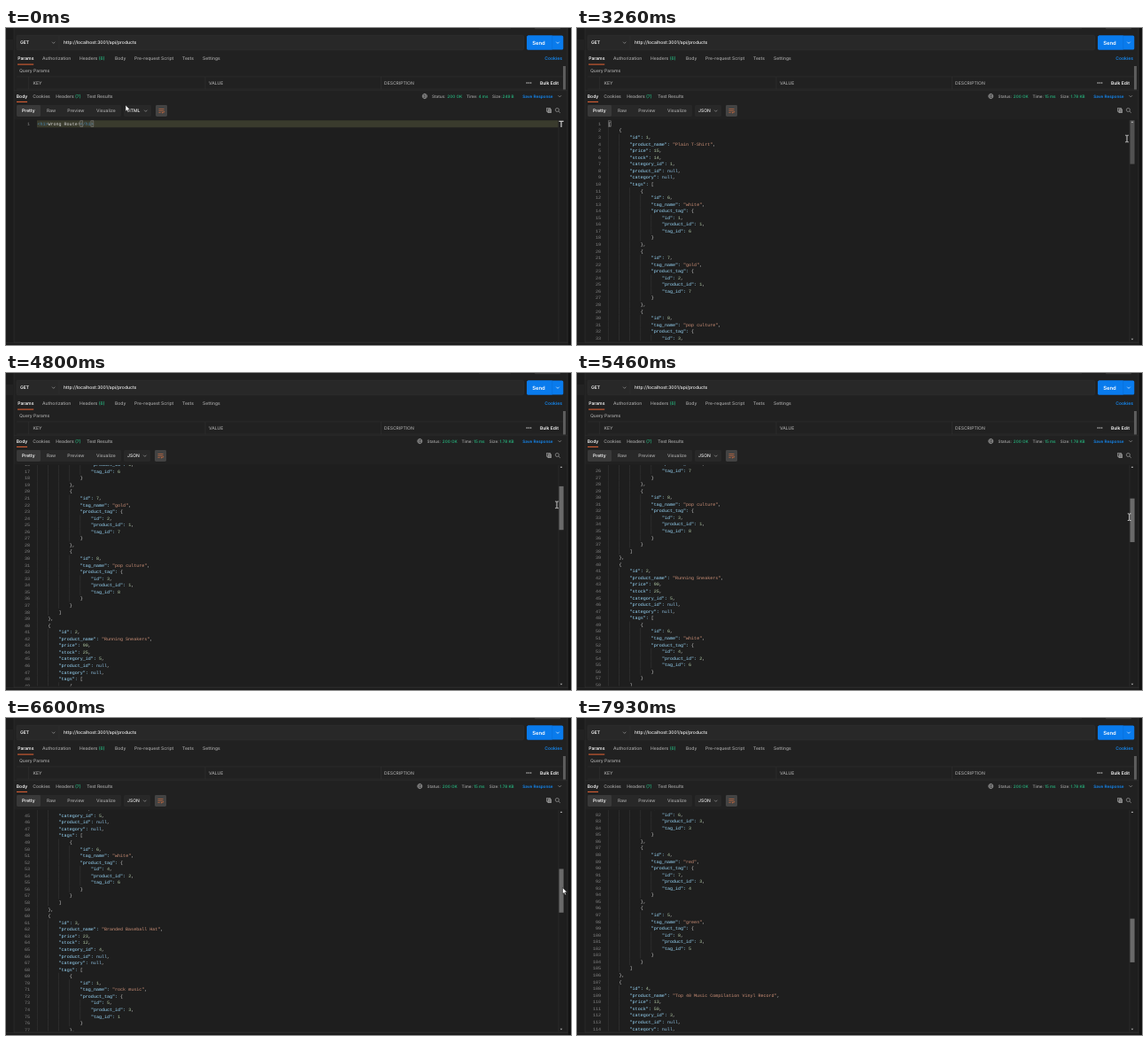
Animation, 638 px wide and 358 px high, one loop 8 s. Source, as an HTML page:

```html
<!DOCTYPE html>
<html lang="en">
<head>
<meta charset="utf-8">
<title>API client</title>
<style>
  html, body { margin: 0; width: 100%; height: 100%; overflow: hidden; background: #1c1c1c; }
  svg { display: block; width: 638px; height: 358px; cursor: default; }
  text { font: 500 5.04px Inter, sans-serif; fill: #a6a6a6; text-rendering: geometricPrecision; white-space: pre; }
  .on { fill: #f2f2f2; font-weight: 600; }
  .url { fill: #eee; }
  .green { fill: #26b980; }
  .blue { fill: #1488f2; font-weight: 600; }
  .small { font-size: 4.65px; }
  .send { fill: #fff; font-size: 5.9px; font-weight: 600; }
  .line { fill: none; stroke: #303030; stroke-width: .6; }
  .icon { fill: none; stroke: #a8a8a8; stroke-width: .65; }
  .code text { font: 5.04px "Liberation Mono", monospace; fill: #d4d4d4; }
  .code .number { fill: #858585; text-anchor: end; }
  .code .key { fill: #9cdcfe; }
  .code .string { fill: #ce9178; }
  .code .digit { fill: #b5cea8; }
  .code .null { fill: #8fc0e0; }
  .code .tag { fill: #4b86ad; }
  .guide { fill: none; stroke: #3d3d3d; stroke-width: .5; }
  .bracket { fill: #ffffff14; stroke: #888; stroke-width: .45; }
</style>
</head>
<body>
<svg viewBox="0 0 638 358">
  <defs>
    <clipPath id="viewport"><rect x="9" y="104" width="615" height="249.5"/></clipPath>
    <path id="chevron" d="M-1.7-.8 0 .9 1.7-.8" fill="none" stroke-width=".65"/>
  </defs>

  <!-- window -->
  <rect width="638" height="358" fill="#1c1c1c"/>
  <rect x="9" width="625" height="354.5" fill="#212121"/>
  <rect x="9" y="103.5" width="625" height="251" fill="#1e1e1e"/>
  <path class="line" d="M9 0V355H634V0M0 355.5H638"/>
  <rect x="635" width="3" height="358" fill="#121212"/>
  <rect x="597" y="-2" width="29" height="3.2" rx="1" fill="#3a3a3a"/>
  <rect x="534" y="-1" width="36" height="1.7" fill="#303030"/>
  <rect x="0" y="13" width="8" height="12" fill="#222"/>

  <!-- request bar -->
  <rect x="12" y="8.2" width="572.5" height="16.6" rx="1.4" fill="#282828" stroke="#323232" stroke-width=".5"/>
  <path class="line" d="M60 8.5V24.5"/>
  <text class="on" x="16" y="18.3">GET</text>
  <use href="#chevron" x="53.7" y="16.5" stroke="#a6a6a6"/>
  <text class="url" x="65" y="18.2">http://localhost:3001/api/products</text>
  <rect x="588.2" y="8.4" width="41.1" height="16.2" rx="1.6" fill="#097bed"/>
  <path id="sendFace" d="M589.8 8.4H616.5V24.6H589.8Q588.2 24.6 588.2 23V10Q588.2 8.4 589.8 8.4Z"/>
  <path d="M616.7 8.4V24.6" stroke="#0a6bd0" stroke-width=".5"/>
  <text class="send" x="594.2" y="18.6">Send</text>
  <use href="#chevron" x="623" y="16.5" stroke="#fff"/>

  <!-- request tabs -->
  <text class="on" x="13.2" y="36.4">Params</text>
  <path d="M13 41.1H31.2" stroke="#ff6c37" stroke-width=".9"/>
  <text x="41" y="36.4">Authorization</text>
  <text x="83" y="36.4">Headers <tspan class="green">(6)</tspan></text>
  <text x="123" y="36.4">Body</text>
  <text x="145" y="36.4">Pre-request Script</text>
  <text x="199" y="36.4">Tests</text>
  <text x="222" y="36.4">Settings</text>
  <text class="blue" x="628" y="36.4" text-anchor="end">Cookies</text>
  <text x="15" y="50.2">Query Params</text>
  <path class="line" d="M12 55H629M12 69H629M25.5 55V69M225 55V69M423.5 55V69M9 70.3H634"/>
  <text x="30.5" y="63.8">KEY</text>
  <text x="229" y="63.8">VALUE</text>
  <text x="427" y="63.8">DESCRIPTION</text>
  <g fill="#c8c8c8"><circle cx="588.2" cy="62" r=".8"/><circle cx="590.4" cy="62" r=".8"/><circle cx="592.6" cy="62" r=".8"/></g>
  <text class="on" x="624" y="63.8" text-anchor="end">Bulk Edit</text>
  <rect x="629" y="43" width="3" height="26.5" fill="#5c5c5c"/>

  <!-- response tabs -->
  <text class="on" x="11.8" y="78.6">Body</text>
  <path d="M12 83.4H24" stroke="#ff6c37" stroke-width=".9"/>
  <text x="30.3" y="78.6">Cookies</text>
  <text x="56.3" y="78.6">Headers <tspan class="green">(7)</tspan></text>
  <text x="91.3" y="78.6">Test Results</text>
  <text class="blue small" x="583.3" y="78.6">Save Response</text>
  <use href="#chevron" x="625.3" y="77" stroke="#a6a6a6"/>

  <!-- viewer toolbar -->
  <rect x="12" y="87" width="118" height="13" rx="1.4" fill="#282828"/>
  <rect x="12" y="87" width="27" height="13" rx="1.4" fill="#393939"/>
  <text class="on" x="18" y="95.2">Pretty</text>
  <text x="46" y="95.2">Raw</text>
  <text x="69.3" y="95.2">Preview</text>
  <text x="102" y="95.2">Visualize</text>
  <g class="icon">
    <rect x="610.7" y="90.6" width="3.6" height="3.9"/><rect x="612" y="91.8" width="3.6" height="3.9" fill="#777"/>
    <circle cx="622.4" cy="92.5" r="2"/><path d="M623.9 94 625.8 95.9"/>
  </g>
  <path class="line" d="M624 104V354"/>

  <g id="before"></g>
  <g id="after"></g>

  <path id="edge" d="M632.9 0V358" stroke="#2878b8" stroke-width="1"/>

  <g id="cursor" stroke-linejoin="round">
    <path id="arrow" d="M0 0V7.2L1.7 5.7 2.8 8.2 4 7.7 2.9 5.3H5.1Z" fill="#fff" stroke="#111" stroke-width=".5"/>
    <path id="hand" d="M-.7.2Q0-.8.7.2V3.2L3.4 3.8Q4.2 4.1 4 5L3.4 8H-.6L-2.6 5Q-2.6 3.8-1.5 4.2L-.7 4.8Z" fill="#fff" stroke="#111" stroke-width=".5"/>
    <path id="beam" d="M-1.8-3.8H-.5L0-3.3.5-3.8H1.8M0-3.3V3.3M-1.8 3.8H-.5L0 3.3.5 3.8H1.8" fill="none" stroke="#eee" stroke-width=".85"/>
    <path id="resize" d="M-4.2 0-2-1.8V-.45H2V-1.8L4.2 0 2 1.8V.45H-2V1.8Z" fill="#fff" stroke="#111" stroke-width=".4"/>
  </g>
</svg>
<script>
const $ = id => document.getElementById(id);
const LINE = 7.56, CHAR = 3.024, LEFT = 35.4, TOP = 104.5;

function add(parent, name, attrs = {}, content = '') {
  const node = document.createElementNS('http://www.w3.org/2000/svg', name);
  for (const key in attrs) node.setAttribute(key, attrs[key]);
  if (content) node.textContent = content;
  return parent.appendChild(node);
}

function addCode(parent, row, source, pattern, classify) {
  const indent = source.search(/\S/);
  const y = TOP + row * LINE + 5.4;
  add(parent, 'text', { class: 'number', x: 27, y }, String(row + 1));
  const line = add(parent, 'text', { x: LEFT + indent * CHAR, y });
  for (const part of source.trim().split(pattern).filter(Boolean))
    add(line, 'tspan', { class: classify(part) }, part);
  let guides = '';
  for (let i = 0; i < indent; i += 4) guides += `M${LEFT + i * CHAR} ${TOP + row * LINE}v${LINE}`;
  if (guides) add(parent, 'path', { class: 'guide', d: guides });
}

function addBracket(parent, column) {
  add(parent, 'rect', { class: 'bracket', x: LEFT + column * CHAR, y: TOP + .3, width: CHAR, height: LINE - .6 });
}

// Response summary, language menu and wrap button shift with their contents.
function addSummary(parent, x, sizeX, time, size, language, wrapX) {
  const globe = add(parent, 'g', { class: 'icon', transform: `translate(${x - 8.2} 77)` });
  add(globe, 'circle', { r: 2.6 });
  add(globe, 'ellipse', { rx: 1.1, ry: 2.6 });
  add(globe, 'path', { d: 'M-2.6 0H2.6' });
  const field = (at, label, value, valueAt) => {
    add(parent, 'text', { x: at, y: 78.6, class: 'small' }, label);
    add(parent, 'text', { x: valueAt, y: 78.6, class: 'small green' }, value);
  };
  field(x, 'Status:', '200 OK', x + 17.3);
  field(x + 39, 'Time:', time, x + 52.5);
  field(sizeX, 'Size:', size, sizeX + 11.6);
  add(parent, 'rect', { x: 133, y: 87, width: wrapX - 138, height: 13, rx: 1.4, fill: '#282828' });
  add(parent, 'text', { x: 137, y: 95.2, class: 'url' }, language);
  add(parent, 'use', { href: '#chevron', x: wrapX - 11.2, y: 93.5, stroke: '#a6a6a6' });
  add(parent, 'rect', { x: wrapX, y: 87, width: 13, height: 13, rx: 1.4, fill: '#434343' });
  add(parent, 'path', { transform: `translate(${wrapX + 6.5} 93.5)`, fill: 'none', stroke: '#d9703f', 'stroke-width': .65,
    d: 'M-3-2H3M-3 0H2Q3.2 0 3.2 1T2 2H.6M1.5 1.1.6 2 1.5 2.9M-3 2H-.8' });
}

const before = $('before'), after = $('after');
addSummary(before, 481, 549, '4 ms', '249 B', 'HTML', 169);
add(before, 'rect', { x: LEFT - .4, y: TOP - .2, width: 588.5, height: 8, fill: '#3a3b2d' });
const html = add(before, 'g', { class: 'code' });
addCode(html, 0, '<h1>Wrong Route!</h1>', /(<\/?h1>)/, part => part[0] === '<' ? 'tag' : '');
addBracket(before, 16);
addBracket(before, 20);
add(before, 'path', { d: 'M624.4 105.4H629.6M627 105.4V112', stroke: '#c4c4c4', 'stroke-width': 1.3 });

let link = 0;
const product = (id, product_name, price, stock, category_id, tags) => ({
  id, product_name, price, stock, category_id, product_id: null, category: null,
  tags: tags.map(([tag, tag_name]) => ({
    id: tag, tag_name, product_tag: { id: ++link, product_id: id, tag_id: tag }
  }))
});
const white = [6, 'white'], rock = [1, 'rock music'];
const products = [
  product(1, 'Plain T-Shirt', 15, 14, 1, [white, [7, 'gold'], [8, 'pop culture']]),
  product(2, 'Running Sneakers', 90, 25, 5, [white]),
  product(3, 'Branded Baseball Hat', 23, 12, 4, [rock, [3, 'blue'], [4, 'red'], [5, 'green']]),
  product(4, 'Top 40 Music Compilation Vinyl Record', 13, 50, 3, [rock])
];

addSummary(after, 475.5, 545.8, '15 ms', '1.78 KB', 'JSON', 168);
const viewport = add(after, 'g', { 'clip-path': 'url(#viewport)' });
const page = add(viewport, 'g', { class: 'code' });
const jsonClass = part =>
  /^".*":$/.test(part) ? 'key' : part[0] === '"' ? 'string' : /^\d/.test(part) ? 'digit' : part === 'null' ? 'null' : '';
JSON.stringify(products, null, 4).split('\n').forEach((source, row) =>
  addCode(page, row, source, /("[^"]*":?|\d+|null)/, jsonClass));
addBracket(page, 0);
const thumb = add(after, 'rect', { x: 624.5, y: 104.3, width: 5.1, height: 49.3 });
add(after, 'path', { d: 'M625.7 107 627 105.2 628.3 107ZM625.7 350.7H628.3L627 352.5Z', fill: '#b0b0b0' });

// Smooth curve through [time, value] points that never overshoots them.
function curve(points) {
  const rate = points.slice(1).map(([t, v], i) => (v - points[i][1]) / (t - points[i][0]));
  const slope = points.map((_, i) => {
    const a = rate[i - 1] ?? rate[i], b = rate[i] ?? a;
    return a * b > 0 ? 2 * a * b / (a + b) : 0;
  });
  return t => {
    let i = 0;
    while (i < points.length - 2 && t >= points[i + 1][0]) i++;
    const [t0, v0] = points[i], [t1, v1] = points[i + 1];
    const span = t1 - t0, u = Math.min(1, Math.max(0, (t - t0) / span)), w = 1 - u;
    return v0 * w * w * (1 + 2 * u) + v1 * u * u * (3 - 2 * u)
      + span * u * w * (slope[i] * w - slope[i + 1] * u);
  };
}

const scroll = curve([[0, 0], [3560, 0], [4800, 118], [6130, 265.5], [7130, 419.5], [7930, 611.4], [8000, 627]]);
const cursorX = curve([[0, 135], [150, 135], [860, 592], [2050, 592], [2650, 616], [2950, 625], [3260, 621],
  [4800, 622], [6130, 626.4], [7130, 632], [7800, 645], [8000, 648]]);
const cursorY = curve([[0, 87], [150, 87], [860, 18], [2050, 18], [2900, 121], [3260, 125], [8000, 125.5]]);
const pointers = [[0, 'arrow'], [820, 'hand'], [2130, 'arrow'], [2600, 'beam'], [5500, 'arrow'], [6850, 'resize']];

const show = (node, visible) => { node.style.display = visible ? '' : 'none'; };

function draw(now) {
  const t = now % 8000, offset = scroll(t), loaded = t >= 1860;
  show(before, !loaded);
  show(after, loaded);
  page.setAttribute('transform', `translate(0 ${-offset})`);
  thumb.setAttribute('transform', `translate(0 ${offset * .2})`);
  thumb.setAttribute('fill', t > 3500 ? '#6a6a6a' : '#525252');
  $('cursor').setAttribute('transform', `translate(${cursorX(t)} ${cursorY(t) + offset * .2})`);
  const pointer = pointers.filter(([start]) => t >= start).pop()[1];
  for (const name of ['arrow', 'hand', 'beam', 'resize']) show($(name), name === pointer);
  $('sendFace').setAttribute('fill', pointer === 'hand' ? '#0a6bd6' : '#097bed');
  show($('edge'), t >= 6980 && t < 7600);
  requestAnimationFrame(draw);
}
requestAnimationFrame(draw);
</script>
</body>
</html>
```
